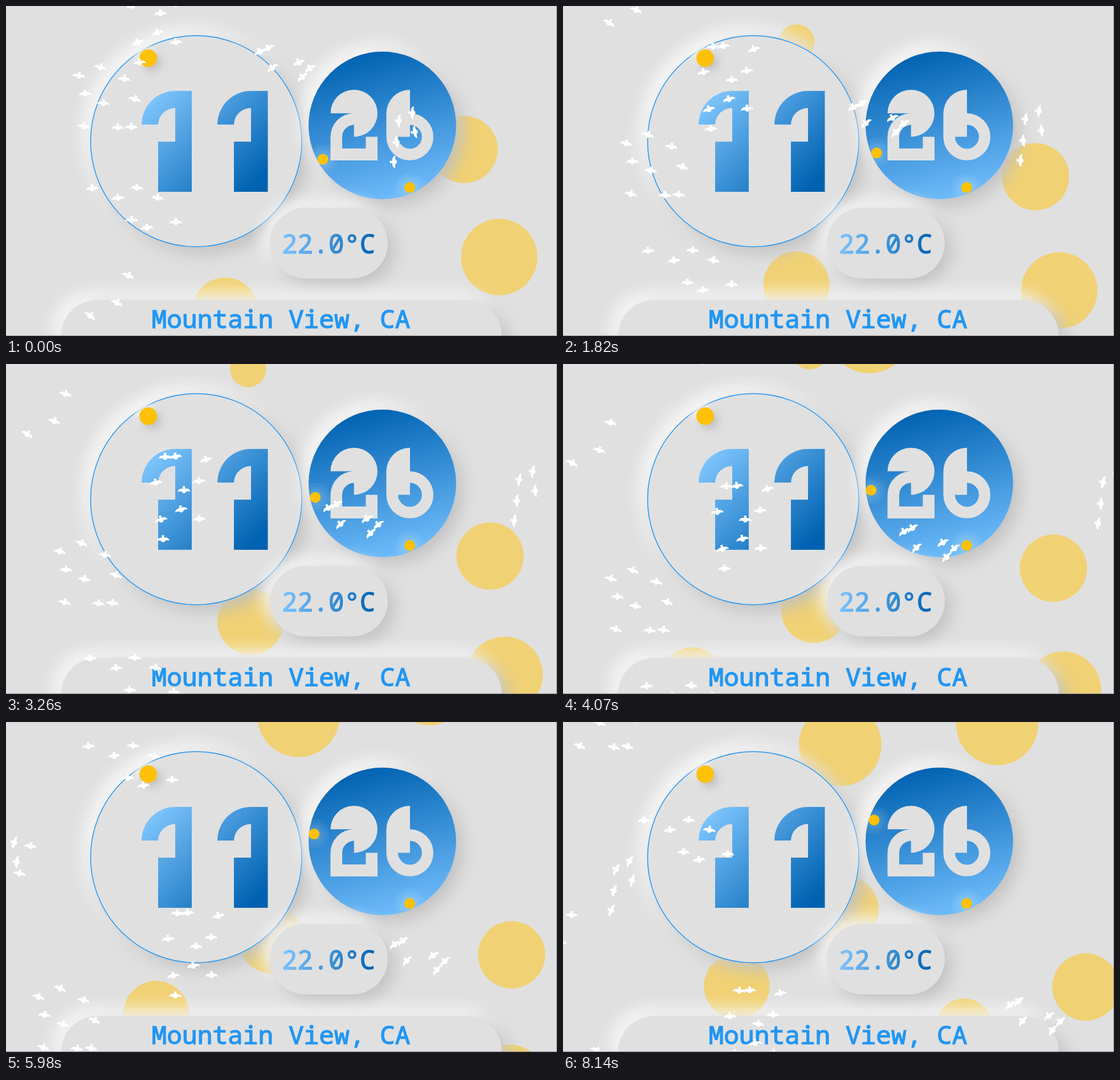
Write an HTML page with a canvas that moves like this. It is 967 px wide and 579 px high and loops after 8.19 s.

```html
<!DOCTYPE html>
<html lang="en">
<head>
<meta charset="utf-8">
<title>Clock face with birds</title>
<style>
  html, body { margin: 0; width: 100%; height: 100%; overflow: hidden; background: #e0e0e0; }
  #stage { position: relative; width: 967px; height: 579px; overflow: hidden; background: #e0e0e0; }
  #stage > * { position: absolute; left: 0; top: 0; }
  #stage > .raised {
    background: #e0e0e0;
    box-shadow: 10px 10px 30px #bebebe, -10px -10px 30px #fff;
  }
  #stage > .face { left: 148px; top: 51px; width: 372px; height: 372px; border-radius: 50%; }
  #stage > .hour { left: 234px; top: 75.5px; width: 31px; height: 31px; border-radius: 50%; background: #ffc107;
    box-shadow: 7px 7px 16px #bebebe, -7px -7px 16px #f4f4f4; }
  #stage > .disc { left: 530.5px; top: 79.5px; width: 259px; height: 259px; border-radius: 50%;
    background: linear-gradient(165deg, #0062b1 8%, #76c1ff 96%); }
  #stage > .pill { left: 463px; top: 354px; width: 207px; height: 124px; border-radius: 62px; }
  #stage > .panel { left: 97px; top: 516px; width: 773px; height: 130px; border-radius: 62px; }
  #stage > .edge { width: 966px; height: 578px; border: solid #8c8c8c; border-width: 0 1px 1px 0; }
  text { font-family: "Roboto Mono", "Noto Sans Mono", "DejaVu Sans Mono", monospace; stroke-width: 1.4; }
</style>
</head>
<body>
<div id="stage">
  <canvas id="back" width="967" height="579"></canvas>
  <div class="raised face"></div>
  <svg width="967" height="579"><circle cx="333.8" cy="237.2" r="185.3" fill="none" stroke="#2196f3" stroke-width="1.5"/></svg>
  <div class="raised hour"></div>
  <div class="raised disc"></div>
  <div class="raised pill"></div>
  <div class="raised panel"></div>
  <svg width="967" height="579">
    <defs>
      <linearGradient id="big" gradientUnits="userSpaceOnUse" x1="250" y1="160" x2="420" y2="330">
        <stop stop-color="#80c7ff"/><stop offset="1" stop-color="#0062b1"/>
      </linearGradient>
      <linearGradient id="warm" gradientUnits="userSpaceOnUse" x1="486" y1="405" x2="646" y2="430">
        <stop stop-color="#7cc4ff"/><stop offset="1" stop-color="#0062b1"/>
      </linearGradient>
      <clipPath id="inDisc"><circle cx="660" cy="209" r="129.5"/></clipPath>
      <g id="dot">
        <g fill="#fff" fill-opacity=".05"><circle r="15"/><circle r="20"/><circle r="26"/></g>
        <circle r="9.5" fill="#ffc107"/>
      </g>
    </defs>
    <path fill="url(#big)" d="M238 208A59 59 0 0 1 297 149H326V326H267V238H297V179A30 29 0 0 0 267 208Z
      M371 208A59 59 0 0 1 430 149H459.5V326H400V238H430V179A30 29 0 0 0 400 208Z"/>
    <g fill="#e0e0e0">
      <path d="M569.5 188.2A41.25 41.25 0 0 1 652 188.2A41.25 41.25 0 0 1 610.75 229.5V208.5A21 21 0 0 0 590 229.5V250H631.5V229.5H652V271H569.5V229.5A41.25 41.25 0 0 1 610.75 188.2Z"/>
      <path fill-rule="evenodd" d="M709 147V188.2A41.3 41.3 0 1 1 667.5 229.5V188.2A41.3 41.3 0 0 1 709 147ZM709 208.5A21 21 0 1 1 688 229.5H709Z"/>
    </g>
    <g clip-path="url(#inDisc)">
      <use href="#dot" x="708.5" y="318.5"/>
      <use href="#dot" id="second"/>
    </g>
    <text x="484" y="434" font-size="45.6" fill="url(#warm)" stroke="url(#warm)">22.0°C</text>
    <text x="255.6" y="565" font-size="44.5" fill="#2196f3" stroke="#2196f3">Mountain View, CA</text>
  </svg>
  <canvas id="front" width="967" height="579"></canvas>
  <div class="edge"></div>
</div>
<script>
const LOOP = 8190, W = 967, H = 579;
const back = document.getElementById("back").getContext("2d");
const front = document.getElementById("front").getContext("2d");
const second = document.getElementById("second");

// Bubbles drift in straight lines: pos in px, vel in px per second.
const bubbles = [
  { r: 59, pos: [804, 251.7], vel: [13.95, 26.2] },
  { r: 67, pos: [865.6, 440.5], vel: [2.9, 32.2] },
  { r: 58, pos: [384.7, 534.5], vel: [13.7, -25.3] },
  { r: 31.7, pos: [391, 133.5], vel: [10.4, -38.2] },
  { r: 72.5, pos: [588.2, -152.1], vel: [-12.5, 23.6] },
  { r: 72, pos: [691.2, -260.6], vel: [8.7, 32.5] },
  { r: 57.6, pos: [148.7, 646.5], vel: [19.2, -22.5] },
  { r: 49.6, pos: [660, 779], vel: [5.4, -30] }
];

// A flock is a loose grid: `wide` birds per line, spaced by `col`, lines spaced by `row`.
// Its centre follows pos + vel t + acc t².
const flocks = [
  { n: 9, wide: 3, col: [42, 3], row: [10, 48], pos: [177, 164], vel: [-8.4, 67.4], acc: [-0.58, -1.2] },
  { n: 7, wide: 4, col: [37, 0], row: [60, 55], pos: [242, 355], vel: [-1.1, 60.3], acc: [0, 0] },
  { n: 10, wide: 3, col: [36, 0], row: [0, 50], pos: [265, 30], vel: [15.3, 64.3], acc: [-0.8, -0.1] },
  { n: 6, wide: 3, col: [36, 20], row: [30, -10], pos: [490, 100], vel: [33.5, 54], acc: [1, -0.35] },
  { n: 5, wide: 2, col: [36, 0], row: [0, 35], pos: [700, 230], vel: [70, -4], acc: [-1.6, 1.35] },
  { n: 3, wide: 1, col: [0, 0], row: [-35, 37], pos: [188, 514], vel: [-40, 70], acc: [1.9, -1] }
];

// Seen from above, heading towards +y
const bird = new Path2D(
  "M-11.5 3Q-9.5-2.5-4-2.4L-1.6-2.8L-2.6-6.2Q0-7.2 2.6-6.2L1.6-2.8L4-2.4Q9.5-2.5 11.5 3Q7 1.8 4 3Q2.5 5.6 0 5.8Q-2.5 5.6-4 3Q-7 1.8-11.5 3Z");

// Leaving one side of the sky brings a bird back on the other.
const wrap = (v, size, margin) => ((v + margin) % size + size) % size - margin;
const jitter = seed => 9 * Math.sin(seed * 127.1);

function drawBubbles(t) {
  back.clearRect(0, 0, W, H);
  back.fillStyle = "#f0d174";
  for (const { r, pos, vel } of bubbles) {
    back.beginPath();
    back.arc(pos[0] + vel[0] * t, pos[1] + vel[1] * t, r, 0, 7);
    back.fill();
  }
}

function drawFlock({ n, wide, col, row, pos, vel, acc }, t) {
  const lines = Math.ceil(n / wide);
  const turn = Math.atan2(vel[1] + 2 * acc[1] * t, vel[0] + 2 * acc[0] * t) - Math.PI / 2;
  for (let i = 0; i < n; i++) {
    const c = i % wide - (wide - 1) / 2;
    const l = Math.floor(i / wide) - (lines - 1) / 2;
    const [x, y] = [0, 1].map(k =>
      pos[k] + vel[k] * t + acc[k] * t * t + c * col[k] + l * row[k] + jitter(i * 2 + k + n));
    front.save();
    front.translate(wrap(x, W + 93, 40), wrap(y, H + 59, 30));
    front.rotate(turn + jitter(i + n) / 60);
    front.fill(bird);
    front.restore();
  }
}

function drawBirds(t) {
  front.clearRect(0, 0, W, H);
  front.fillStyle = "#fff";
  for (const f of flocks) drawFlock(f, t);
}

// The second marker jumps six degrees at a time.
function drawSecond(t) {
  const a = (150 + 6 * Math.floor(t + 0.08)) * Math.PI / 180;
  second.setAttribute("x", 660 + 120 * Math.cos(a));
  second.setAttribute("y", 209 + 120 * Math.sin(a));
}

let start;
function frame(now) {
  start ??= now;
  const t = ((now - start) % LOOP) / 1000;
  drawBubbles(t);
  drawBirds(t);
  drawSecond(t);
  requestAnimationFrame(frame);
}
requestAnimationFrame(frame);
</script>
</body>
</html>
```
